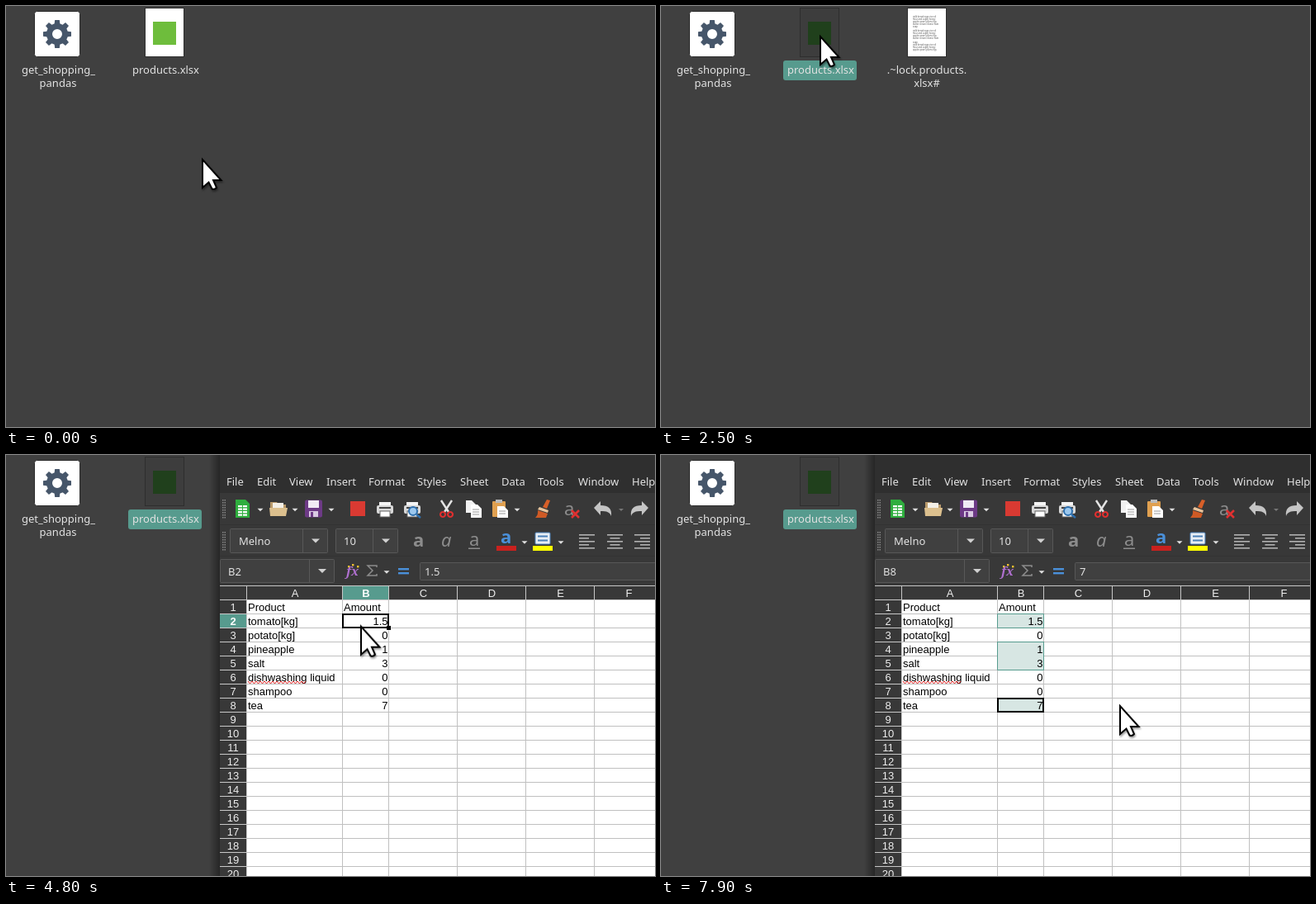
An HTML page that plays this animation: 786x510 px, repeating every 8000 ms.

```html
<!DOCTYPE html>
<html lang="en">
<head>
<meta charset="utf-8">
<title>Spreadsheet selection</title>
<style>
html, body { margin: 0; width: 100%; height: 100%; overflow: hidden; background: #404040; }
svg { display: block; width: 786px; height: 510px; }
text { font: 13px "Noto Sans", sans-serif; fill: #e2e2e2; white-space: pre; }
.mid { text-anchor: middle; }
.end { text-anchor: end; }
.cell { font-family: "Liberation Sans", sans-serif; fill: #000; }
.head { font-family: "Liberation Sans", sans-serif; text-anchor: middle; fill: #eee; }
.bold { font-weight: bold; fill: #fff; }
.tiny { font-size: 2.6px; fill: #555; }
.glyph { font-size: 22px; fill: #8c8c8c; }
.field { fill: #404040; stroke: #585858; }

.sel, .lock, .win, .early, .late, .c4, .b2, .b4, .b5, .b8, .multi, .salt, .cursor {
  animation: 8s step-end infinite;
}
.sel { animation-name: sel; }
.lock { animation-name: lock; }
.win { animation-name: win; }
.early { animation-name: early; }
.late { animation-name: late; }
.c4 { animation-name: c4; }
.b2 { animation-name: b2; }
.b4, .multi { animation-name: b4; }
.multi { animation-name: multi; }
.b5 { animation-name: b5; }
.salt { animation-name: salt; }
.b8 { animation-name: b8; }
@keyframes sel { 0% { opacity: 0 } 17.5% { opacity: 1 } }
@keyframes lock { 0% { opacity: 0 } 31.25% { opacity: 1 } }
@keyframes win { 0% { opacity: 0 } 35% { opacity: 1 } }
@keyframes early { 0% { opacity: 1 } 36.25% { opacity: 0 } }
@keyframes late { 0% { opacity: 0 } 36.25% { opacity: 1 } }
@keyframes c4 { 0% { opacity: 1 } 57.5% { opacity: 0 } }
@keyframes b2 { 0% { opacity: 0 } 57.5% { opacity: 1 } 70% { opacity: 0 } }
@keyframes b4 { 0% { opacity: 0 } 70% { opacity: 1 } 82.5% { opacity: 0 } }
@keyframes multi { 0% { opacity: 0 } 70% { opacity: 1 } }
@keyframes b5 { 0% { opacity: 0 } 82.5% { opacity: 1 } 93.75% { opacity: 0 } }
@keyframes salt { 0% { opacity: 0 } 82.5% { opacity: 1 } }
@keyframes b8 { 0% { opacity: 0 } 93.75% { opacity: 1 } }

/* file icon: selected, then dimmed while it opens */
.page { animation: page 8s step-end infinite; }
.badge { animation: badge 8s step-end infinite; }
@keyframes page {
  0% { fill: #fff }
  17.5% { fill: #579b8e }
  21.25% { fill: #579b8e; animation-timing-function: steps(4, start) }
  26.25% { fill: #3d3d3d }
}
@keyframes badge {
  0% { fill: #6ebd3c }
  17.5% { fill: #2f8b25 }
  21.25% { fill: #2f8b25; animation-timing-function: steps(4, start) }
  26.25% { fill: #20401c }
}

.cursor { animation-name: cursor; filter: drop-shadow(1px 2px 1px rgba(0, 0, 0, .4)); }
@keyframes cursor {
  0% { transform: translate(238px, 186px) }
  3.75% { transform: translate(238px, 186px); animation-timing-function: steps(6, start) }
  11.25% { transform: translate(179px, 21px); animation-timing-function: steps(2, start) }
  13.75% { transform: translate(193px, 37px) }
  21.25% { transform: translate(193px, 37px); animation-timing-function: steps(2, start) }
  23.75% { transform: translate(192px, 43px); animation-timing-function: steps(2, start) }
  26.25% { transform: translate(193px, 37px) }
  40% { transform: translate(193px, 37px); animation-timing-function: steps(1, start) }
  41.25% { transform: translate(180px, 23px); animation-timing-function: steps(7, start) }
  50% { transform: translate(382px, 202px); animation-timing-function: steps(1, start) }
  51.25% { transform: translate(407px, 201px); animation-timing-function: steps(1, start) }
  52.5% { transform: translate(415px, 192px); animation-timing-function: steps(2, start) }
  55% { transform: translate(425px, 200px) }
  60% { transform: translate(425px, 200px); animation-timing-function: steps(3, start) }
  63.75% { transform: translate(440px, 223px) }
  65% { transform: translate(440px, 223px); animation-timing-function: steps(2, start) }
  67.5% { transform: translate(444px, 228px) }
  70% { transform: translate(444px, 228px); animation-timing-function: steps(3, start) }
  73.75% { transform: translate(458px, 254px); animation-timing-function: steps(5, start) }
  80% { transform: translate(459px, 262px) }
  82.5% { transform: translate(459px, 262px); animation-timing-function: steps(6, start) }
  90% { transform: translate(457px, 303px) }
  91.25% { transform: translate(457px, 303px); animation-timing-function: steps(1, start) }
  92.5% { transform: translate(456px, 304px) }
  98.75% { transform: translate(456px, 304px); animation-timing-function: steps(1, start) }
  100% { transform: translate(556px, 304px) }
}
</style>
</head>
<body>
<svg id="stage" viewBox="0 0 786 510"></svg>
<script>
const TEAL = '#579b8e', BAR = '#383838', TINT = '#d7e6e3';
const xs = [291.5, 407.5, 463.5, 546.5, 629.5, 712.5, 795.5];
const top_ = row => 175.5 + 17 * (row - 1);
const range = n => [...Array(n).keys()];

const rect = (x, y, w, h, fill, more = '') =>
  `<rect x="${x}" y="${y}" width="${w}" height="${h}" fill="${fill}" ${more}/>`;
const text = (x, y, s, cls = '', more = '') => `<text x="${x}" y="${y}" class="${cls}" ${more}>${s}</text>`;
const path = (d, fill, more = '') => `<path d="${d}" fill="${fill}" ${more}/>`;
const line = (d, color, w = 1, more = '') => path(d, 'none', `stroke="${color}" stroke-width="${w}" ${more}`);
const group = (cls, ...parts) => `<g class="${cls}">${parts.join('')}</g>`;
const arrow = (x, y, s = 3.5, fill = '#e0e0e0') => path(`M${x - s} ${y - s / 2}h${2 * s}l${-s} ${s}z`, fill);
const field = (x, y, w, h) => `<rect class="field" x="${x}.5" y="${y}.5" width="${w}" height="${h}" rx="1"/>`;

function combo(x, y, w, h, split) {
  return field(x, y, w, h) + line(`M${split}.5 ${y + 1}v${h - 1}`, '#585858') +
    arrow((split + x + w) / 2 + 1, y + h / 2 + .5, 5, '#d0d0d0');
}

function desktop() {
  const teeth = range(8).map(i =>
    path('M-3.6-11L-2.8-17h5.6L3.6-11z', '#46566a', `transform="translate(62 34) rotate(${i * 45})"`)).join('');
  const gear = rect(34.5, 6.5, 55, 55, '#fff', 'rx="3" stroke="#2c2c2c"') + teeth +
    '<circle cx="62" cy="34" r="9.5" fill="#fff" stroke="#46566a" stroke-width="7"/>';
  const words = ['milk bread eggs rice oil', 'flour and sugar, honey', 'apples pears plums figs',
    'butter cream cheese ham', 'soap'];
  const lines = range(13).map(i =>
    text(305, 14 + i * 3 + (i > 4 ? 2 : 0) + (i > 8 ? 2 : 0), words[i % 5], 'tiny')).join('');
  return gear + text(63.5, 82, 'get_shopping_', 'mid') + text(63, 98, 'pandas', 'mid') +
    rect(168.5, 2.5, 47, 59, '#fff', 'class="page" stroke="#2e2e2e"') +
    rect(178, 19, 28, 28, '#6ebd3c', 'class="badge"') +
    group('sel', rect(148, 66, 89, 24, TEAL, 'rx="3"')) +
    text(193.5, 82, 'products.xlsx', 'mid') +
    group('lock', rect(298.5, 2.5, 47, 59, '#fff', 'stroke="#2e2e2e"'), lines,
      text(322, 82, '.~lock.products.', 'mid'), text(322, 98, 'xlsx#', 'mid'));
}

function handle(y) {
  return range(8).map(i => rect(262, y + i * 3, 1.5, 1.5, '#888') + rect(264.5, y + i * 3, 1.5, 1.5, '#888')).join('');
}

function menu() {
  const items = { File: 267, Edit: 304, View: 343, Insert: 388, Format: 439, Styles: 498,
    Sheet: 550, Data: 600, Tools: 644, Window: 693, Help: 758 };
  return Object.entries(items).map(([s, x]) => text(x, 37, s)).join('');
}

const doc = (x, y, w, h, fill = '#f2f2f2') => path(`M${x} ${y}h${w - 5}l5 5v${h - 5}h${-w}z`, fill);
const printer = x => rect(x + 3, 57, 14, 5, '#f4f4f4') + rect(x, 61, 20, 10, '#d8d8d8', 'rx="2"') +
  rect(x + 3, 63, 14, 2, '#444') + rect(x + 4, 68, 12, 7, '#fff', 'stroke="#666"');
const undo = fill => path('M712 64l8-8v5c10 0 14 4 13 13c-2-5-5-6-13-6v5z', fill);
const redo = fill => `<g transform="translate(1490 0) scale(-1 1)">${undo(fill)}</g>`;

function toolbar() {
  const sheet = doc(278, 54, 17, 22, '#2fae3e') +
    range(4).map(i => rect(281, 61 + i * 3.5, 5, 2.2, '#fff') + rect(287, 61 + i * 3.5, 5, 2.2, '#fff')).join('');
  const folder = path('M320 57h8l2 3h9v13h-19z', '#b99a6b') + rect(323, 58, 13, 9, '#f3efe6') +
    path('M319 64h22l-2 10h-19z', '#dcc08e');
  const disk = rect(362, 54.5, 21, 21, '#6d3a86', 'rx="2"') + rect(366, 55, 13, 9, '#f1eaf5') +
    rect(367, 68, 11, 7, '#d9c9e2') + rect(369, 69, 3, 6, '#6d3a86');
  const preview = printer(482) + '<circle cx="493" cy="68" r="5" fill="#9cc8ee" stroke="#2d6fae" stroke-width="2"/>' +
    line('M497 72l5 4', '#2d6fae', 2.5);
  const scissors = line('M527 55l9 14M540 55l-9 14', '#e4e4e4', 2.4) +
    line('M529 69a3 3 0 1 0 .1 0zM538 69a3 3 0 1 0 .1 0z', '#e02f2f', 2.2);
  const copy = doc(557, 55, 12, 15) + doc(563, 60, 13, 16, '#fff') +
    line('M565 66h8M565 69h8M565 72h8', '#999');
  const paste = rect(589, 56, 16, 19, '#e0a050', 'rx="1"') + rect(593, 54, 8, 4, '#bbb') + doc(595, 62, 13, 14, '#fff') +
    line('M597 68h8M597 71h8', '#999');
  const brush = path('M655 54l4 1-4 10-5-2z', '#d85f28') + path('M646 63l11 4-1 3-12-4z', '#e8c49c') +
    path('M644 67l12 4-2 5h-13q4-4 3-9z', '#cf5a25');
  const clear = text(676, 73, 'a', 'glyph', 'font-style="italic"') +
    line('M685 67l9 9M694 67l-9 9', '#e03030', 2.6);
  const tools = group('early', doc(278, 54, 17, 22), path('M290 54v5h5z', '#bbb'), undo('#f3b63c'), redo('#52b043'), arrow(745, 66.5)) +
    group('late', sheet, undo('#c4c4c4'), redo('#c4c4c4'), arrow(745, 66.5, 3, '#777'));
  return handle(54) + tools + folder + disk + rect(417, 56, 18, 18, '#d93a32') + printer(449) + preview +
    scissors + copy + paste + brush + clear + [308, 350, 394, 619].map(x => arrow(x, 66.5)).join('');
}

function formatBar() {
  const bars = (x, align) => range(5).map(i => {
    const w = i % 2 ? 12 : 19;
    return rect(x + (19 - w) * align, 96 + i * 4, w, 1.6, '#b0b0b0');
  }).join('');
  return handle(93) + combo(271, 89, 118, 29, 359) + combo(399, 89, 75, 29, 444) +
    group('early', text(409, 109, '2')) +
    group('late', text(282, 109, 'Melno', '', 'font-style="italic"'), text(409, 109, '10')) +
    text(493, 111, 'a', 'glyph', 'style="font-weight:bold"') + text(527, 111, 'a', 'glyph', 'style="font-style:italic"') +
    text(561, 110, 'a', 'glyph') + rect(560, 112.5, 14, 1.5, '#8c8c8c') +
    text(599, 107, 'a', 'glyph', 'style="fill:#4a90d9;font-weight:bold"') + rect(594, 110, 24, 6, '#c9211e') + arrow(628, 106) +
    rect(641, 94, 18, 14, '#e8eef4', 'rx="1" stroke="#4a80b8"') + line('M644 98.5h12M644 103.5h12', '#4a80b8', 2) +
    rect(638, 110, 24, 6, '#ffff00') + arrow(672, 106) +
    bars(694, 0) + bars(728, .5) + bars(761, 1);
}

function formulaBar() {
  const stars = [[414, 134], [419, 132], [425, 134]].map(([x, y]) => rect(x, y, 2.4, 2.4, '#f0c030')).join('');
  return combo(259, 126, 138, 28, 367) + stars +
    text(412, 146, 'fx', '', 'style="font:italic bold 15px \'Noto Serif\',serif;fill:#b070d0"') +
    line('M449 136v-2h-11l6 6-6 6h11v-2', '#8c8c8c', 1.5) + arrow(461, 142) +
    rect(475, 137, 13, 2.4, '#4a90d9') + rect(475, 142, 13, 2.4, '#4a90d9') + field(501, 130, 300, 21);
}

const goods = [['Product', 'Amount'], ['tomato[kg]', 1.5], ['potato[kg]', 0], ['pineapple', 1],
  ['salt', 3], ['dishwashing liquid', 0], ['shampoo', 0], ['tea', 7]];

const tint = (row, n = 1, outline = true) =>
  rect(407.5, top_(row), 56, 17 * n, TINT, outline ? `stroke="${TEAL}"` : '');

function sheet() {
  const rows = range(20).map(i => i + 1);
  const tints = group('multi', tint(2), tint(4)) + group('salt', tint(4, 2)) + group('b8', tint(8));
  const grid = line(xs.map(x => `M${x} 176v334`).join('') + rows.map(r => `M292 ${top_(r + 1)}h494`).join(''), '#c0c0c0');
  const inner = group('multi', line('M407.5 192.5h56v17h-56zM407.5 226.5h56v17h-56z', TEAL)) +
    group('salt', rect(408, 227, 55, 33, TINT), line('M407.5 226.5h56v34h-56z', TEAL));
  const heads = rect(259, 159, 527, 17, BAR) + rect(259, 176, 32, 334, BAR) +
    line('M259 158.5h527M259 175.5h527' + xs.map(x => `M${x} 159v17`).join('') +
      rows.map(r => `M259 ${top_(r + 1)}h32`).join('') + 'M291.5 176v334', '#c8c8c8') +
    [...'ABCDEF'].map((c, i) => text((xs[i] + xs[i + 1]) / 2 + .5, 172, c, 'head')).join('') +
    rows.map(r => text(275, top_(r) + 13.5, r, 'head')).join('');
  const cells = goods.map(([name, n], i) => {
    const y = top_(i + 1) + 13.5;
    return text(293, y, name, 'cell') + (i ? text(462.5, y, n, 'cell end') : text(409, y, n, 'cell'));
  }).join('');
  const wave = line('M293 274' + 'l2.5 3l2.5-3'.repeat(14), '#e02020', 1);
  return rect(259, 176, 527, 334, '#fff') + tints + grid + inner + heads + cells + group('late', wave);
}

// active cell with its name and content; a lone cell also lights its headers
function active(col, row, value, lone) {
  const x = xs[col], w = xs[col + 1] - x, y = top_(row), c = 'ABC'[col];
  const lit = !lone ? '' :
    rect(x + .5, 159, w - 1, 16, TEAL) + text(x + w / 2 + .5, 172, c, 'head bold') +
    rect(259, y + .5, 32, 16, TEAL) + text(275, y + 13.5, row, 'head bold') +
    rect(x + w - 3, y + 14, 6, 6, '#fff') + rect(x + w - 2.5, y + 14.5, 5, 5, '#000');
  return group((c + row).toLowerCase(), lit,
    rect(x + .5, y + .5, w - 1, 16, 'none', 'stroke="#000" stroke-width="2"'),
    text(269, 146, c + row), text(507, 146, value));
}

const shade = '<defs><linearGradient id="shade"><stop offset="0" stop-opacity="0"/>' +
  '<stop offset="1" stop-opacity=".4"/></linearGradient></defs>';
const frame = rect(246, 0, 13, 510, 'url(#shade)') + rect(259, 0, 527, 46, '#2f2f2f') + rect(259, 46, 527, 113, BAR) +
  line('M259 84.5h527M259 122.5h527', '#333');
const pointer = path('M0 0V34L7.5 27.5L11.5 35.5Q14.5 37 17 34L13 25H22.5Z', '#fff',
  'stroke="#000" stroke-width="2"');

document.getElementById('stage').innerHTML = shade + rect(0, 0, 786, 510, '#404040') + desktop() +
  group('win', frame, menu(), toolbar(), formatBar(), formulaBar(), sheet(),
    active(2, 4, '', true), active(1, 2, 1.5, true), active(1, 4, 1), active(1, 5, 3), active(1, 8, 7)) +
  group('cursor', pointer);
</script>
</body>
</html>
```
